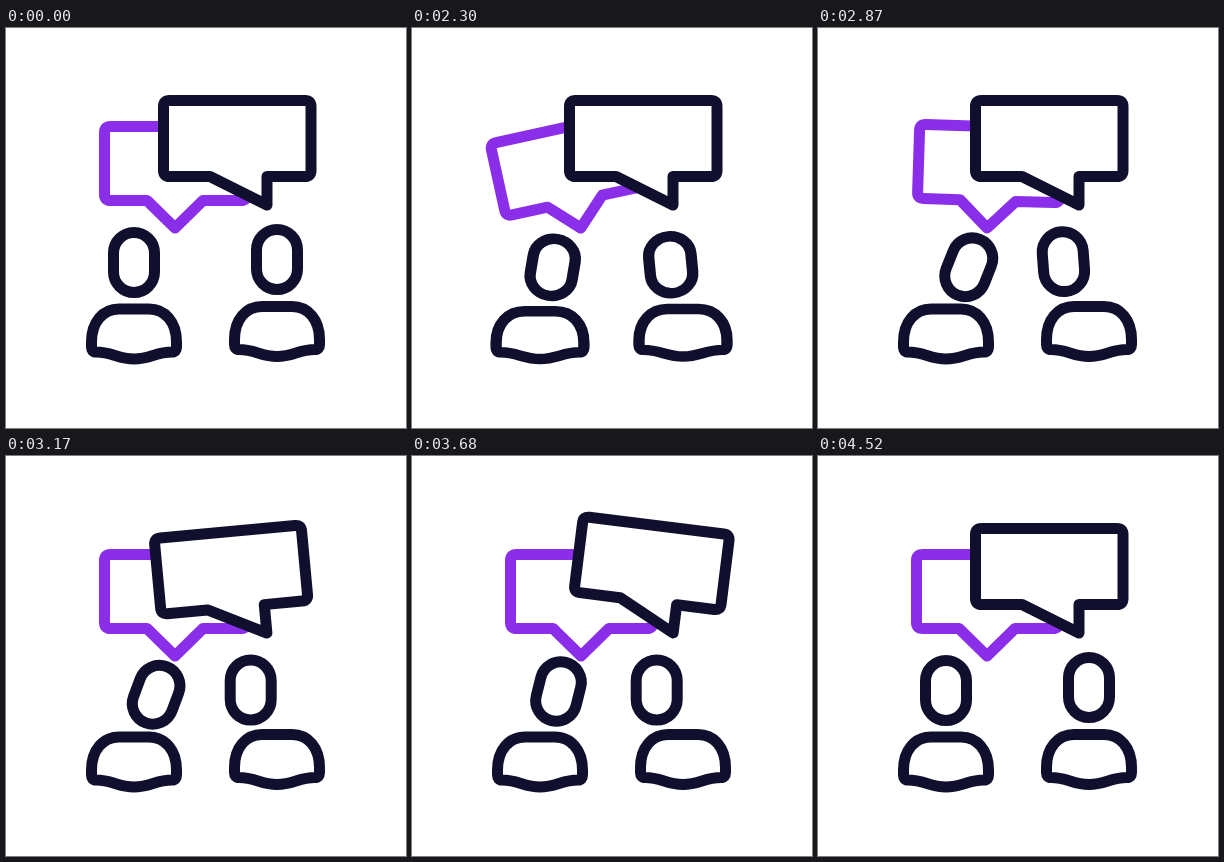
An HTML page for the animation above (4550 ms loop, 400 by 400 pixels).

```html
<!DOCTYPE html>
<html lang="en">
<head>
<meta charset="utf-8">
<title>Conversation</title>
<style>
  html, body { margin: 0; width: 100%; height: 100%; overflow: hidden; background: #fff; }
  svg { display: block; width: 100vw; height: 100vh; }
  .line { fill: none; stroke: #10102e; stroke-width: 11; stroke-linecap: round; stroke-linejoin: round; }
</style>
</head>
<body>
<svg viewBox="0 0 400 400">
  <defs>
    <rect id="head" x="-20.5" y="-30" width="41" height="60" rx="20.5"/>
    <path id="body" d="M-42.5 -12V-17C-42.5 -37 -31 -50 -15 -50H15C31 -50 42.5 -37 42.5 -17V-12Q42.5 -7 38 -7C22 -7 16 0 0 0C-16 0 -22 -7 -38 -7Q-42.5 -7 -42.5 -12Z"/>
  </defs>
  <g class="line">
    <path id="bubbleLeft" stroke="#8a2eea" d="M104.500 98.500H235Q241 98.500 241 104.500V166.500Q241 172.500 235 172.500H197L169 200L141 172.500H104.500Q98.500 172.500 98.500 166.500V104.500Q98.500 98.500 104.500 98.500Z"/>
    <path id="bubbleRight" fill="#fff" d="M163.500 72.500H299Q305 72.500 305 78.500V142.500Q305 148.500 299 148.500H261V177L204 148.500H163.500Q157.500 148.500 157.500 142.500V78.500Q157.500 72.500 163.500 72.500Z"/>
    <use id="headLeft" href="#head"/>
    <use id="headRight" href="#head"/>
    <use id="bodyLeft" href="#body"/>
    <use id="bodyRight" href="#body"/>
  </g>
</svg>
<script>
const LOOP = 4550;
const PEAKS = [0, -20, 15, -8.5, 4, 0];

const progress = (t, start, length) => Math.min(Math.max((t - start) / length, 0), 1);
const ease = p => (1 - Math.cos(Math.PI * p)) / 2;
const hump = p => Math.sin(Math.PI * p);

// Swings through the peaks, easing in and out of each one.
function wobble(t, start, step) {
  const p = progress(t, start, step * (PEAKS.length - 1)) * (PEAKS.length - 1);
  const i = Math.min(Math.floor(p), PEAKS.length - 2);
  return PEAKS[i] + (PEAKS[i + 1] - PEAKS[i]) * ease(p - i);
}

// Leaning out and back; the person dips and squashes on both ways.
function lean(t, out, outLength, back, backLength) {
  const p = progress(t, out, outLength), q = progress(t, back, backLength);
  return { amount: ease(p) - ease(q), dip: hump(p) + hump(q) };
}

function pose(id, ...transforms) {
  document.getElementById(id).setAttribute("transform", transforms.join(" "));
}

const move = (x, y) => `translate(${x} ${y})`;
const squash = dip => `scale(${1 + 0.035 * dip} ${1 - 0.05 * dip})`;

function draw() {
  const t = performance.now() % LOOP;

  pose("bubbleLeft", `rotate(${wobble(t, 1992, 236)} 169 201)`);
  pose("bubbleRight", `rotate(${wobble(t, 3085, 249)} 261 178)`);

  const left = lean(t, 1990, 500, 4110, 400);
  const nod = hump(progress(t, 2300, 1350)) ** 2;
  pose("headLeft",
    move(128 + 18.5 * left.amount + 4.5 * nod, 234.5 + left.amount + 4.5 * left.dip + 4 * nod),
    `rotate(${14 * left.amount + 8 * nod})`, squash(left.dip));
  pose("bodyLeft", move(128, 331), squash(left.dip));

  const right = lean(t, 2040, 520, 3780, 350);
  const tilt = hump(progress(t, 2060, 1020)) ** 2;
  pose("headRight",
    move(271 - 26.3 * right.amount + 2 * tilt, 231.5 + 2.5 * right.amount + 4.5 * right.dip - tilt),
    `rotate(${-12 * tilt})`, squash(right.dip));
  pose("bodyRight", move(271, 328.5), squash(right.dip));

  requestAnimationFrame(draw);
}
draw();
</script>
</body>
</html>
```
